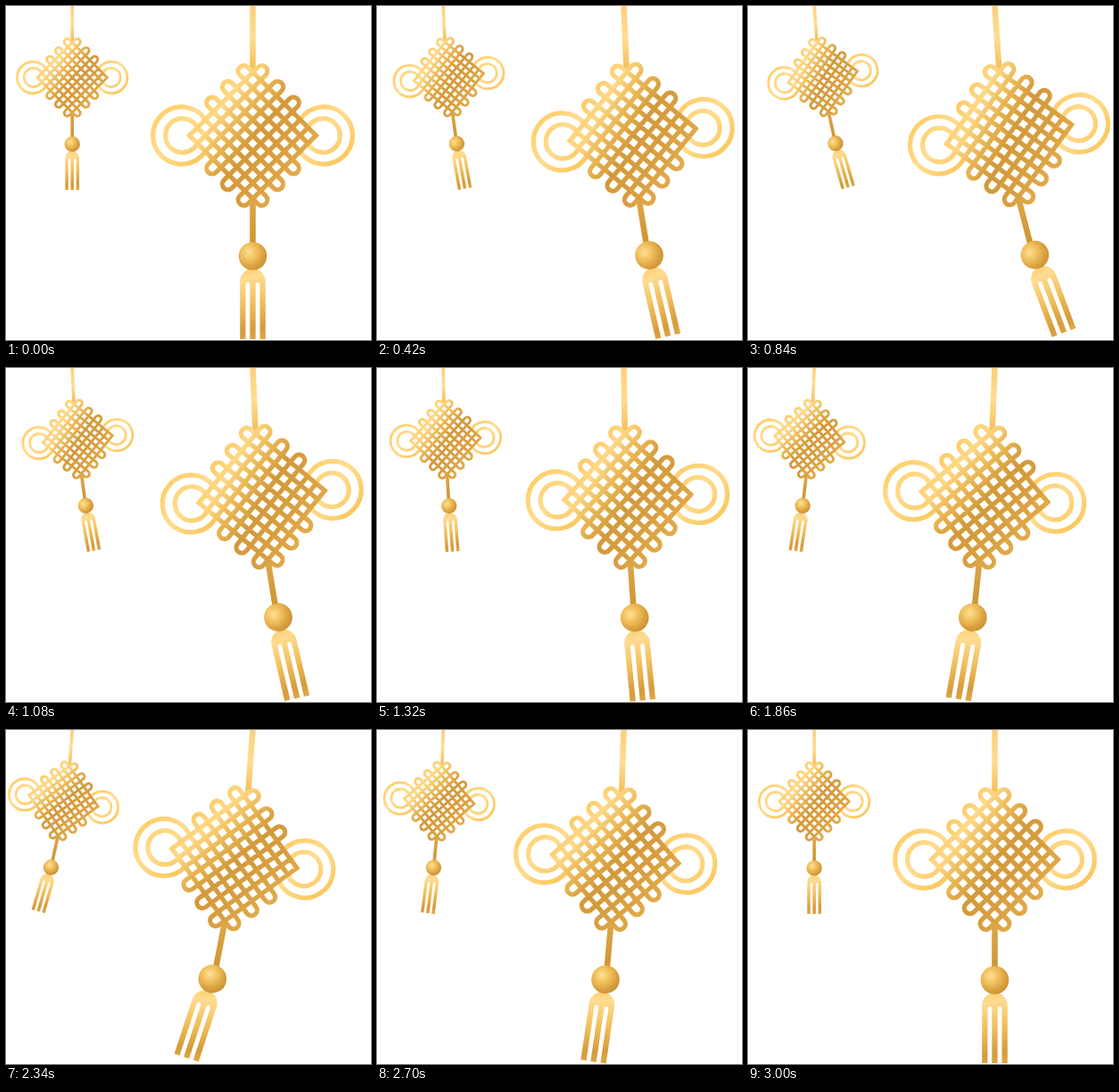
An HTML page for the animation above (3.06 s loop, 409 px wide and 374 px high).

```html
<!DOCTYPE html>
<html lang="en">
<head>
<meta charset="utf-8">
<title>Swinging knots</title>
<style>
  html, body { margin: 0; width: 100%; height: 100%; overflow: hidden; background: #fff; }
  svg { display: block; width: 409px; height: 374px; }
</style>
</head>
<body>
<svg viewBox="0 0 409 374">
  <defs>
    <linearGradient id="cordFill" gradientUnits="userSpaceOnUse" x1="0" y1="0" x2="0" y2="70">
      <stop offset="0" stop-color="#fbd07a"/><stop offset=".5" stop-color="#ffdc92"/><stop offset="1" stop-color="#f3c05a"/>
    </linearGradient>
    <linearGradient id="weave" gradientUnits="userSpaceOnUse" x1="-68" y1="10" x2="68" y2="-10">
      <stop offset="0" stop-color="#fbcb66"/><stop offset=".16" stop-color="#ffd885"/>
      <stop offset=".34" stop-color="#e9b653"/><stop offset=".52" stop-color="#d39a3b"/>
      <stop offset=".75" stop-color="#d89f40"/><stop offset="1" stop-color="#e3ad4b"/>
    </linearGradient>
    <linearGradient id="ring">
      <stop offset="0" stop-color="#ffd06c"/><stop offset=".45" stop-color="#ffdc90"/><stop offset="1" stop-color="#fbc961"/>
    </linearGradient>
    <linearGradient id="stemFill" gradientUnits="userSpaceOnUse" x1="0" y1="215" x2="0" y2="266">
      <stop offset="0" stop-color="#dda748"/><stop offset="1" stop-color="#cf9535"/>
    </linearGradient>
    <radialGradient id="bead" cx=".36" cy=".36" r=".7">
      <stop offset="0" stop-color="#ffe094"/><stop offset=".4" stop-color="#f0c05c"/>
      <stop offset=".75" stop-color="#d9a040"/><stop offset="1" stop-color="#cc9133"/>
    </radialGradient>
    <linearGradient id="fringe" gradientUnits="userSpaceOnUse" x1="268" y1="294" x2="284" y2="373">
      <stop offset="0" stop-color="#fccf70"/><stop offset=".14" stop-color="#ffdc92"/>
      <stop offset=".5" stop-color="#f0bf5c"/><stop offset=".85" stop-color="#d59b3c"/><stop offset="1" stop-color="#dfa845"/>
    </linearGradient>

    <path id="cord" d="M273.2 0h6.6v72h-6.6z" fill="url(#cordFill)"/>
    <g id="knot" transform="translate(276.5 145) rotate(45)" fill="none" stroke-width="5.2">
      <path id="leftRing" stroke="url(#ring)"/>
      <path id="rightRing" stroke="url(#ring)"/>
      <path id="lattice" stroke="url(#weave)" stroke-linecap="square"/>
    </g>
    <path id="stem" d="M273.2 218h6.6v50h-6.6z" fill="url(#stemFill)"/>
    <g id="tassel">
      <path fill="url(#fringe)" d="M262.2 373V308.5a14.3 14.3 0 0 1 28.6 0V373h-6.3V312a2.4 2.4 0 0 0-4.8 0V373h-6.4V312a2.4 2.4 0 0 0-4.8 0V373z"/>
      <circle cx="276.5" cy="280" r="15.8" fill="url(#bead)"/>
    </g>
  </defs>
  <g id="large"></g>
  <g id="small" transform="translate(-78.4 0) scale(.552)"></g>
</svg>
<script>
const GAP = 12.53, EDGE = 4 * GAP, TURN = EDGE + 8;
const STEP = 60, LOOP = 3060, SWING = 3000;
const CENTER = 276.5, LIFT = 1.5;
const pivots = { cord: 0, knot: 145, stem: 243, tassel: 280 };

// [sideways shift, tilt] of each part at the end of a swing
const evenPose = { cord: [0, 4.7], knot: [20, 10.5], stem: [39.7, 14], tassel: [49, 18.4] };
const charms = [
  {
    id: 'large',
    right: { cord: [0, 4.4], knot: [18.2, 9.9], stem: [38, 16.5], tassel: [51, 23.4] },
    left: { cord: [0, 4.8], knot: [23.4, 10], stem: [41.5, 12.5], tassel: [51.3, 20.8] },
  },
  { id: 'small', right: evenPose, left: evenPose },
];

const byId = id => document.getElementById(id);
const setPath = (id, d) => byId(id).setAttribute('d', d);

// One set of parallel strands with its U-turns; swapped gives the crossing set
function strands(swapped) {
  const at = (x, y) => swapped ? `${y} ${x}` : `${x} ${y}`;
  const arc = `A${GAP / 2} ${GAP / 2} 0 0 ${swapped ? 1 : 0} `;
  let d = '';
  for (let k = -4; k <= 4; k++) d += `M${at(-EDGE, k * GAP)}L${at(EDGE, k * GAP)}`;
  for (const side of [-1, 1]) {
    for (const k of [-4, -2, 0]) {
      const a = -side * k * GAP, b = -side * (k + 1) * GAP, x = side * TURN;
      d += `M${at(side * EDGE, a)}L${at(x, a)}${arc}${at(x, b)}L${at(side * EDGE, b)}`;
    }
  }
  return d;
}

function rings(side) {
  const arc = (k, r) =>
    `M${-side * EDGE} ${side * k * GAP}A${r} ${r} 0 1 0 ${-side * k * GAP} ${side * EDGE}`;
  return arc(2, 32) + arc(3, 19);
}

setPath('lattice', strands(false) + strands(true));
setPath('leftRing', rings(1));
setPath('rightRing', rings(-1));

for (const charm of charms) {
  charm.parts = {};
  for (const name in pivots) {
    const part = document.createElementNS('http://www.w3.org/2000/svg', 'use');
    part.setAttribute('href', '#' + name);
    byId(charm.id).append(part);
    charm.parts[name] = part;
  }
}

function draw(time) {
  const t = Math.floor(time % LOOP / STEP) * STEP;
  const swing = 2 / Math.PI * Math.asin(Math.sin(2 * Math.PI * t / SWING));
  for (const charm of charms) {
    const pose = swing > 0 ? charm.right : charm.left;
    for (const name in pivots) {
      const [shift, tilt] = pose[name];
      const lift = shift ? -LIFT * Math.abs(swing) : 0;
      charm.parts[name].setAttribute('transform',
        `translate(${shift * swing} ${lift}) rotate(${-tilt * swing} ${CENTER} ${pivots[name]})`);
    }
  }
}

const start = performance.now();
function tick() {
  draw(performance.now() - start);
  requestAnimationFrame(tick);
}
tick();
</script>
</body>
</html>
```
